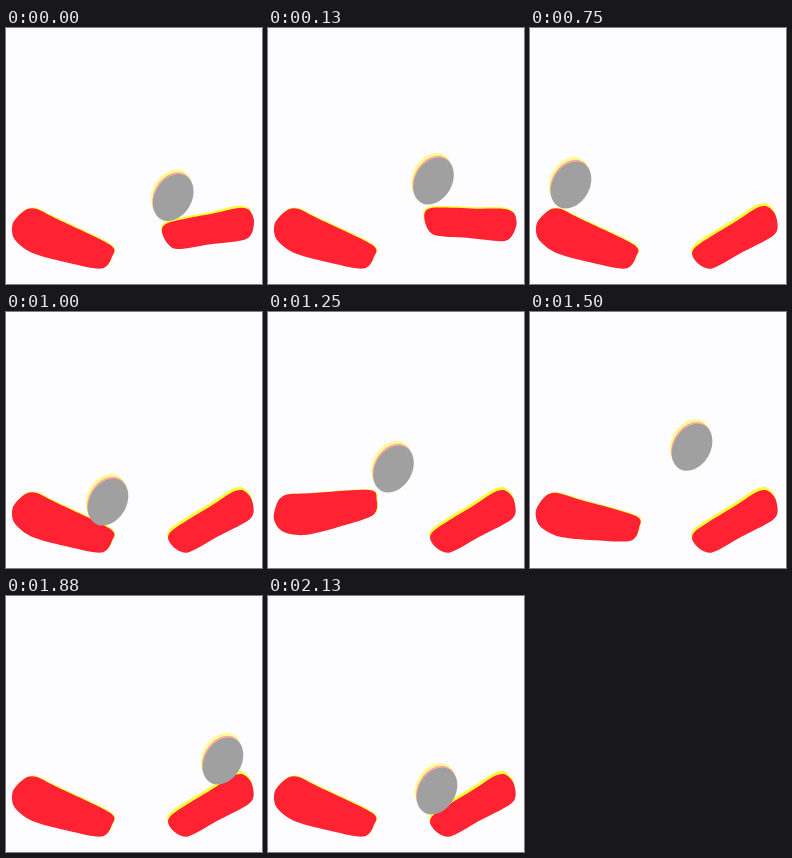
Recreate the animation shown at these times as an HTML page. Size 256 by 256 pixels, loop 2260 ms.

```html
<!DOCTYPE html>
<html lang="en">
<head>
<meta charset="utf-8">
<title>Flippers</title>
<style>
  html, body { margin: 0; width: 100%; height: 100%; overflow: hidden; background: #fdfdff; }
  svg { display: block; width: 100vw; height: 100vh; }
  .edge { fill: #ffff38; }
  .flipper { fill: #ff2233; }
  .glow { fill: #fffa90; }
  .rim { fill: #ffa8a0; }
  .ball { fill: #a0a0a0; }
</style>
</head>
<body>
<svg id="stage" viewBox="0 0 256 256"></svg>
<script>
const LOOP = 2260;
const STEPS = 18;
const stage = document.getElementById('stage');

// Outlines are relative to the pivot, with the flipper lying level.
// Each flipper kicks up for two steps, then falls back to its rest angle.
const LEFT = {
  pivot: [28, 203], edge: [0.7, -0.8],
  rest: 20.7, raised: -8.5, kick: 8, fall: 3,
  outline: [[-22.5, 0], [-16, -16], [-6, -21.5], [16, -19.5], [76, -14],
    [82, -3], [76, 11.5], [40, 18], [5, 21], [-16, 14]]
};
const RIGHT = {
  pivot: [230, 197], edge: [-0.7, -3],
  rest: -29.5, raised: 4, kick: 17, fall: 5,
  outline: [[-74, -2], [-67, -12.5], [-20, -15], [5, -16.5], [15, -13],
    [18.5, -2], [14, 11], [4, 16], [-30, 15], [-64, 14]]
};

// Where the ball touches or leaves a flipper; arc is the height of the hop leading there.
const BOUNCES = [
  { step: -1, x: 169, y: 195 },
  { step: 1, x: 165.5, y: 153, arc: 4.5 },
  { step: 6, x: 41, y: 157, arc: 52.5 },
  { step: 8, x: 102, y: 190, arc: 0 },
  { step: 10, x: 125.5, y: 157, arc: 4 },
  { step: 15, x: 217, y: 165, arc: 26 },
  { step: 17, x: 169, y: 195, arc: 0 }
];

const lerp = (a, b, u) => a + (b - a) * u;

function add(tag, className, attrs) {
  const node = document.createElementNS('http://www.w3.org/2000/svg', tag);
  node.setAttribute('class', className);
  for (const key in attrs) node.setAttribute(key, attrs[key]);
  return stage.appendChild(node);
}

function place(node, x, y, angle) {
  node.setAttribute('transform', `translate(${x} ${y}) rotate(${angle})`);
}

// Closed smooth curve through the points.
function smooth(points) {
  const at = i => points[(i + points.length) % points.length];
  const handle = (p, from, to) => p.map((v, k) => v + (to[k] - from[k]) / 7);
  return 'M' + at(0) + points.map((p, i) => 'C' + [
    handle(p, at(i - 1), at(i + 1)),
    handle(at(i + 1), at(i + 2), p),
    at(i + 1)
  ].join(' ')).join('') + 'Z';
}

function makeFlipper({ pivot: [x, y], edge: [dx, dy], rest, raised, kick, fall, outline }) {
  const d = smooth(outline);
  const edge = add('path', 'edge', { d });
  const body = add('path', 'flipper', { d });
  return step => {
    const age = (step - kick + STEPS) % STEPS;
    const lift = age < 2 ? (age / 2) ** 0.7 : Math.max(0, 1 - (age - 2) / fall);
    const angle = lerp(rest, raised, lift);
    place(edge, x + dx, y + dy * (1 - lift / 2), angle);
    place(body, x, y, angle);
  };
}

function makeBall() {
  const [glow, rim, ball] = ['glow', 'rim', 'ball'].map(name =>
    add('ellipse', name, { rx: 18.5, ry: 25 }));
  return step => {
    const next = Math.max(1, BOUNCES.findIndex(b => b.step >= step));
    const from = BOUNCES[next - 1], to = BOUNCES[next];
    const u = (step - from.step) / (to.step - from.step);
    const x = lerp(from.x, to.x, u);
    const y = lerp(from.y, to.y, u) - 4 * to.arc * u * (1 - u);
    place(glow, x - 2, y - 4.5, 30);
    place(rim, x - 0.7, y - 1.6, 30);
    place(ball, x, y, 30);
  };
}

const parts = [makeFlipper(LEFT), makeFlipper(RIGHT), makeBall()];

// Poses change every eighth of a second, on a 10 ms grid.
const stepStart = step => Math.round(12.5 * step) * 10;

function draw(time) {
  let step = STEPS - 1;
  while (stepStart(step) > time) step--;
  for (const pose of parts) pose(step);
}

const start = performance.now();
function tick() {
  draw((performance.now() - start) % LOOP);
  requestAnimationFrame(tick);
}
tick();
</script>
</body>
</html>
```
